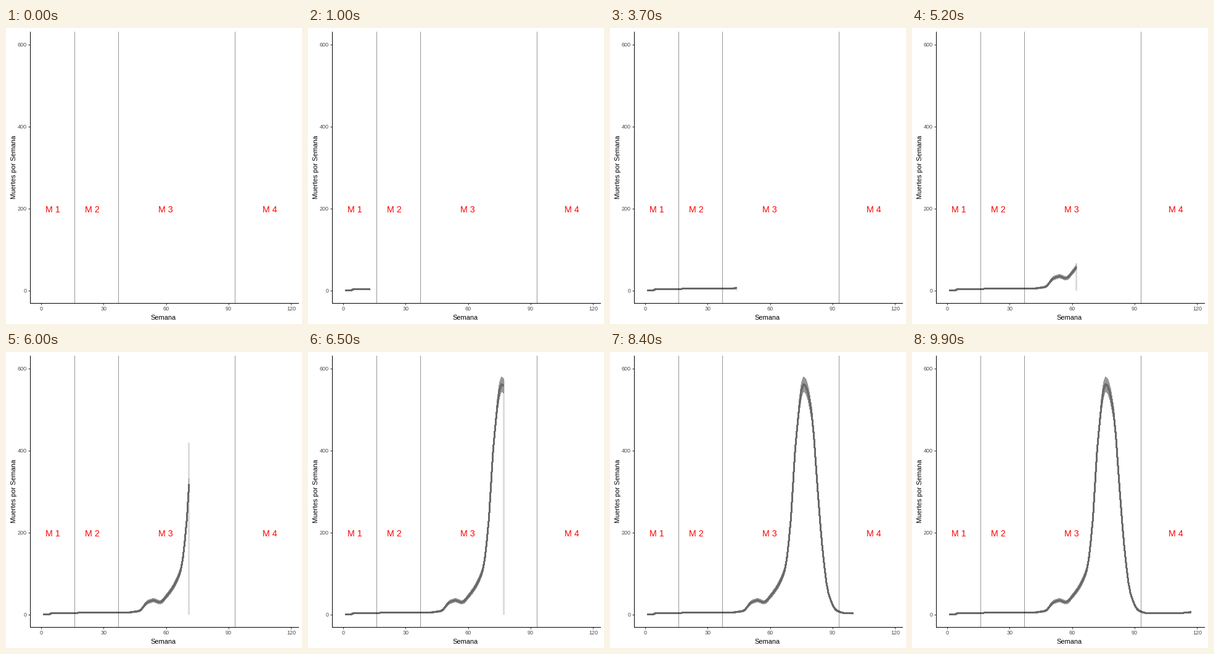
These frames come from a looping animation (480 px wide and 480 px high, 10 s). A matplotlib script:

```python
import numpy as np
import matplotlib.pyplot as plt
from matplotlib.animation import FuncAnimation
from matplotlib.collections import PolyCollection

SIZE, DPI = 480, 96
PX = 72 / DPI  # one pixel in points
FRAMES, INTERVAL = 100, 100
LAST = 117

plt.rcParams["font.family"] = "Liberation Sans"


def smooth(x, keys):
    """Monotone cubic curve through a few key points."""
    kx, ky = np.array(keys, float).T
    step = np.diff(kx)
    rate = np.diff(ky) / step
    a, b = rate[:-1], rate[1:]
    rising = a * b > 0
    slope = np.zeros_like(kx)
    slope[1:-1][rising] = (2 * a * b)[rising] / (a + b)[rising]
    i = np.clip(np.searchsorted(kx, x, side="right") - 1, 0, len(step) - 1)
    h = step[i]
    t = np.clip((x - kx[i]) / h, 0, 1)
    ease = t * t * (3 - 2 * t)
    return (ky[i] * (1 - ease) + ky[i + 1] * ease
            + h * t * (1 - t) * (slope[i] * (1 - t) - slope[i + 1] * t))


weeks = np.arange(1, LAST + 1)

# Low steps at first, then a small wave, the large wave and a quiet tail
steps = 1 + 2.6 * (weeks >= 5) + 1.6 * (weeks >= 18)
wave = smooth(weeks, [(40, 5.2), (47, 9), (51, 30), (54, 35), (57, 30),
                      (60, 44), (67, 108), (70, 235), (72, 400), (76, 562),
                      (77, 558), (80, 488), (83, 293), (85, 168), (88, 52),
                      (92, 10), (96, 4), (112, 4), (LAST, 6)])
trend = np.where(weeks < 40, steps, wave)
margin = 1.96 * np.sqrt(trend / 7)

# Weekly counts run a week ahead of the trend and are noisy when low
rng = np.random.default_rng(4)
counts = 1.05 * np.interp(weeks + 1, weeks, trend)
counts = np.floor(np.where(counts < 10,
                           counts * rng.uniform(0, 0.9, LAST), counts))

# Frame in which each week appears
shown_at = np.floor((FRAMES - 1) * (weeks - 1) / (LAST - 1) + 0.5).astype(int)

fig = plt.figure(figsize=(SIZE / DPI, SIZE / DPI), dpi=DPI, facecolor="white")
left, right, top, bottom = 39, 473.5, 5.5, 446
ax = fig.add_axes([left / SIZE, 1 - bottom / SIZE,
                   (right - left) / SIZE, (bottom - top) / SIZE])
ax.set_xlim(-5.3, 123.3)
ax.set_ylim(-30.1, 632.1)
ax.spines[["top", "right"]].set_visible(False)
ax.spines[["left", "bottom"]].set_linewidth(PX)
ax.set_xticks(range(0, 121, 30))
ax.set_yticks(range(0, 601, 200))
ax.tick_params(length=3 * PX, width=PX, pad=2.2 * PX, color="#333333",
               labelcolor="#4d4d4d", labelsize=9 * PX)


def label(x, y, text, size, color="black", rotation=0):
    fig.text(x / SIZE, 1 - y / SIZE, text, fontsize=size * PX, color=color,
             ha="center", va="baseline", rotation=rotation,
             rotation_mode="anchor")


label(255.5, 473, "Semana", 11)
label(15.5, 225.5, "Muertes por Semana", 11, rotation=90)
for n, x in enumerate((76, 140, 259, 428), start=1):
    label(x, 299, f"M {n}", 14.2, "red")

for x in (16, 37, 93):
    ax.axvline(x, color="black", alpha=0.41, lw=PX, zorder=4)

bars = ax.bar(weeks, counts, width=0.9, color="#dcdcdc", zorder=1)
ribbon = ax.add_collection(
    PolyCollection([], facecolor="#979797", linewidth=0, antialiased=False,
                   zorder=2), autolim=False)
line, = ax.plot([], [], color="#696969", lw=2 * PX, antialiased=False,
                solid_capstyle="butt", solid_joinstyle="round", zorder=3)


def update(i):
    n = np.count_nonzero(shown_at <= i)
    for bar, start in zip(bars, shown_at):
        bar.set_visible(start == i)
    w, mid, half = weeks[:n], trend[:n], margin[:n]
    line.set_data(w, mid)
    ribbon.set_verts([np.column_stack([
        np.r_[w, w[::-1]], np.r_[mid + half, (mid - half)[::-1]]])])
    return [*bars, ribbon, line]


anim = FuncAnimation(fig, update, frames=FRAMES, interval=INTERVAL,
                     repeat=True, repeat_delay=0, blit=False)
plt.show()
```
